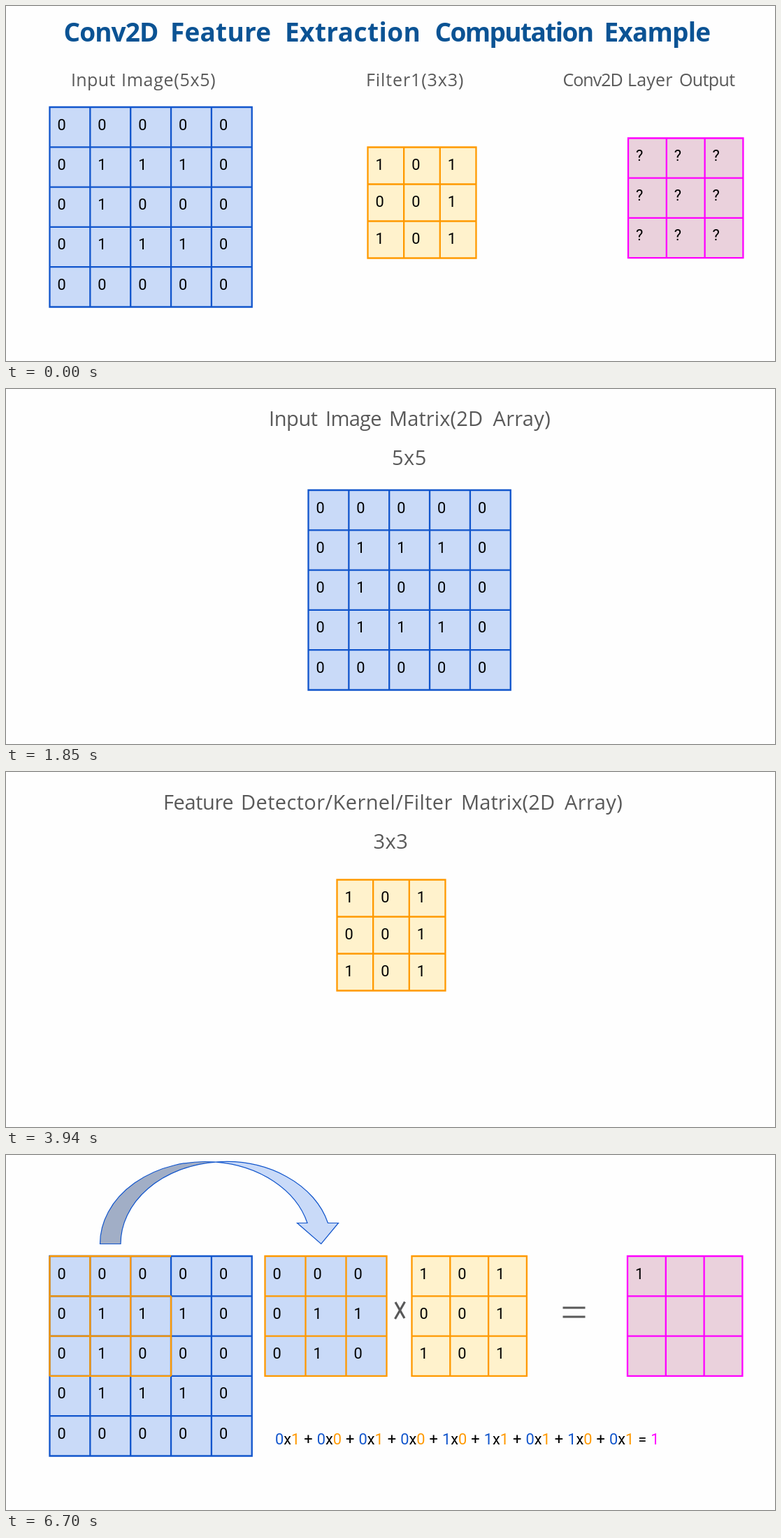
Write an HTML page that moves like this. It is 1100 px wide and 509 px high and loops after 8000 ms.

```html
<!DOCTYPE html>
<html lang="en">
<head>
<meta charset="utf-8">
<title>Conv2D Feature Extraction</title>
<style>
  html, body { margin: 0; width: 100%; height: 100%; overflow: hidden; background: #fefefe; }
  svg { display: block; width: 100%; height: 100%; }
  text { white-space: pre; }
  .cell { font: 21.8px Roboto, sans-serif; }
  .words { font-family: "Comic Sans MS", "Open Sans", sans-serif; font-weight: 500; fill: #595959; }
</style>
</head>
<body>
<svg id="stage" viewBox="0 0 1100 509"></svg>
<script>
const BLUE = '#1155cc', ORANGE = '#ff9900', MAGENTA = '#ff00ff';
const SKY = '#c9daf8', CREAM = '#fff2cc', PINK = '#ead1dc', GRAY = '#595959';

const IMAGE = ['00000', '01110', '01000', '01110', '00000'];
const PATCH = ['000', '011', '010'];
const FILTER = ['101', '001', '101'];

const path = (d, stroke, width, fill = 'none') =>
  `<path d="${d}" stroke="${stroke}" stroke-width="${width}" fill="${fill}"/>`;

// Table whose digits sit at a fixed offset from each cell's corner.
function grid(rows, x, y, w, h, stroke, fill) {
  const n = rows.length, right = x + n * w, bottom = y + n * h;
  let lines = '', digits = '';
  for (let i = 0; i <= n; i++) {
    lines += `M${x} ${y + i * h}H${right}M${x + i * w} ${y}V${bottom}`;
  }
  rows.forEach((row, r) => [...row].forEach((ch, c) => {
    digits += `<text class="cell" x="${x + c * w + 11}" y="${y + r * h + 32.5}">${ch}</text>`;
  }));
  return `<rect x="${x}" y="${y}" width="${n * w}" height="${n * h}" fill="${fill}"/>`
    + `<g stroke-linecap="square">${path(lines, stroke, 2.3)}</g>` + digits;
}

// Each word is [text, x, letter spacing].
const words = (size, y, list, style = '') => list.map(([text, x, spacing]) =>
  `<text class="words" x="${x}" y="${y}" style="font-size:${size}px;letter-spacing:${spacing}px;${style}">${text}</text>`
).join('');

const imageGrid = x => grid(IMAGE, x, 145, 57.85, 57.3, BLUE, SKY);
const filterGrid = (x, y) => grid(FILTER, x, y, 51.65, 53, ORANGE, CREAM);

const overview =
  words(37, 51, [
    ['Conv2D', 82.5, -.9], ['Feature', 235, .2], ['Extraction', 399, .4],
    ['Computation', 613.5, -1.6], ['Example', 855.5, -.8]
  ], 'font-weight:700;fill:#0b5394') +
  words(25, 115, [
    ['Input', 93, .4], ['Image(5x5)', 165, .7], ['Filter1(3x3)', 515, .9],
    ['Conv2D', 796.5, -1], ['Layer', 889, .2], ['Output', 963, -.6]
  ]) +
  imageGrid(62.5) + filterGrid(517.5, 202.5) +
  grid(['???', '???', '???'], 890, 189.5, 54.8, 57.2, MAGENTA, PINK);

const inputMatrix =
  words(29, 53, [['Input', 376, -.4], ['Image', 457, -.7], ['Matrix(2D', 548, .1], ['Array)', 696.5, .3]]) +
  words(29, 109, [['5x5', 552, .5]]) +
  imageGrid(432.5);

const filterMatrix =
  words(29, 54, [['Feature', 225, -.4], ['Detector/Kernel/Filter', 336, .4], ['Matrix(2D', 651, .1], ['Array)', 799, .4]]) +
  words(29, 110, [['3x3', 525.5, .5]]) +
  filterGrid(473.5, 154.5);

function formula() {
  const span = (color, text) => `<tspan fill="${color}">${text}</tspan>`;
  const patch = PATCH.join(''), filter = FILTER.join('');
  const terms = [...patch].map((p, i) => span(BLUE, p) + 'x' + span(ORANGE, filter[i]));
  return `<text class="cell" x="385" y="414.5" style="word-spacing:.6px">${terms.join(' + ')} = ${span(MAGENTA, 1)}</text>`;
}

const arc = sweep => `A150.75 118 0 0 ${sweep} `;
const arrow =
  path(`M134.5 127.5${arc(1)}300 10.07${arc(0)}164 127.5Z`, BLUE, 1.2, '#a1aec6') +
  path(`M300 10.07${arc(1)}460.5 97.5H475.5L450.75 127.5 416.5 97.5H431${arc(0)}300 10.07Z`, BLUE, 1.2, SKY);

const selection = path(
  'M62.5 145H236M62.5 202.3H236M62.5 259.6H236M62.5 316.9H236' +
  'M62.5 145V316.9M120.35 145V316.9M178.2 145V316.9M236.05 202.3V316.9', ORANGE, 2.3);

const computation =
  arrow + imageGrid(62.5) + selection +
  grid(PATCH, 370.5, 145, 58, 57.3, ORANGE, SKY) +
  path('M557 211L570 234M570.5 210.5L556.5 235', GRAY, 3.2) +
  grid(FILTER, 580.5, 145, 54.8, 57.3, ORANGE, CREAM) +
  path('M796.5 219H828.5M796.5 232H828.5', GRAY, 3.2) +
  grid(['1', '', ''], 889, 145, 54.8, 57.3, MAGENTA, PINK) +
  formula();

const LOOP = 8000;
const scenes = [[0, overview], [500, inputMatrix], [2750, filterMatrix], [4740, computation]];
const stage = document.getElementById('stage');
stage.innerHTML = scenes.map(([, markup]) => `<g>${markup}</g>`).join('');

const start = performance.now();
function draw() {
  const time = (performance.now() - start) % LOOP;
  const current = scenes.filter(([from]) => from <= time).length - 1;
  [...stage.children].forEach((group, i) => {
    group.style.display = i === current ? '' : 'none';
  });
  requestAnimationFrame(draw);
}
draw();
</script>
</body>
</html>
```
